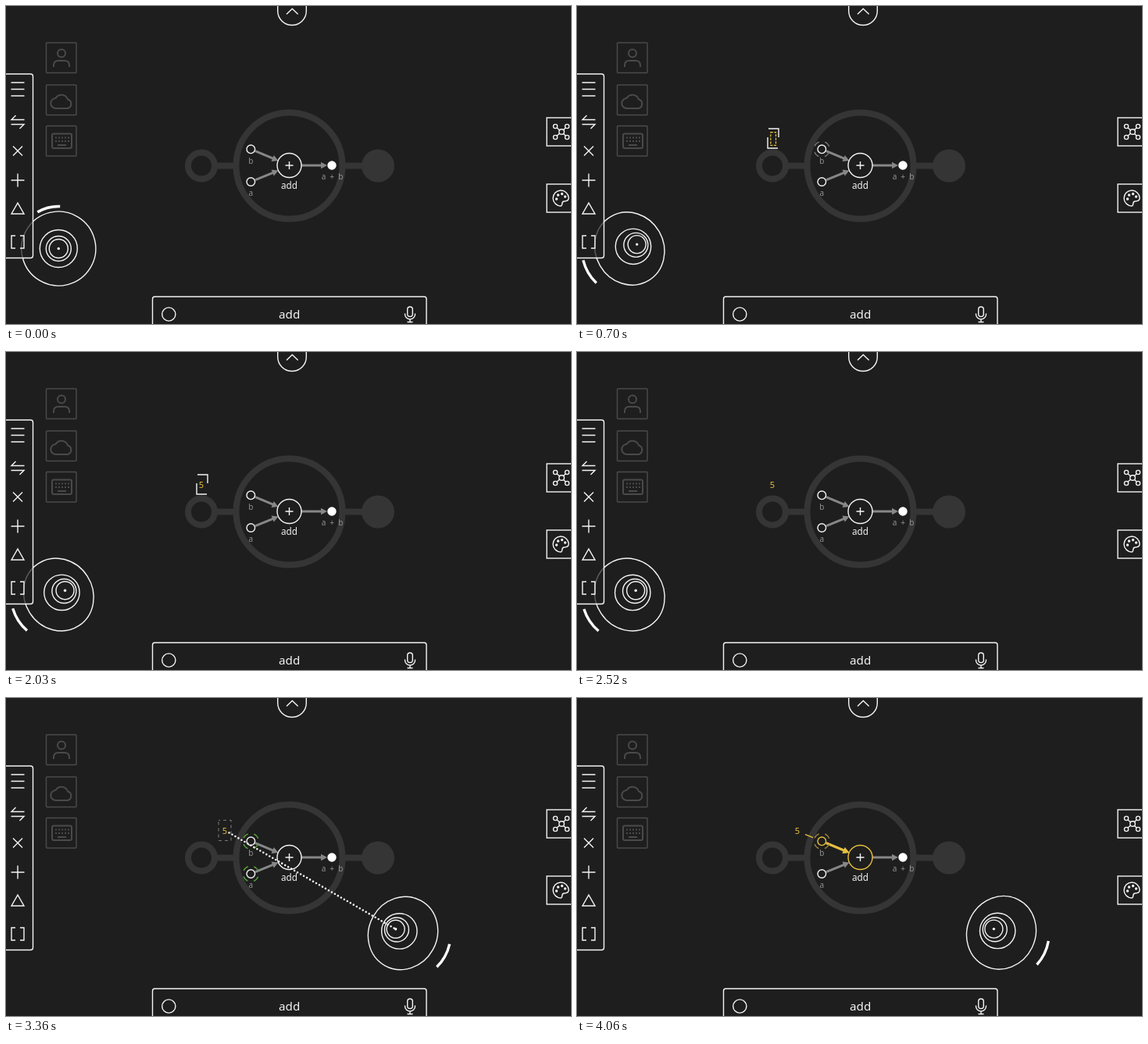
An HTML page that plays this animation: 723 px wide and 407 px high, repeating every 4130 ms.

```html
<!DOCTYPE html>
<html lang="en">
<head>
<meta charset="utf-8">
<title>Node editor</title>
<style>
html, body { margin: 0; width: 100%; height: 100%; overflow: hidden; background: #1e1e1e; }
svg { display: block; width: 723px; height: 407px; }
text { font-family: "Noto Sans", "Open Sans", sans-serif; text-anchor: middle; }
.line { fill: none; stroke: #f4f4f4; stroke-width: 1.4; }
.dim { fill: none; stroke: #4a4a4a; stroke-width: 1.5; }
.back { fill: none; stroke: #353535; stroke-width: 8; }
.panel { fill: #1e1e1e; stroke: #f4f4f4; stroke-width: 1.4; }
.small { font-size: 10px; fill: #929292; }
.ring { fill: none; stroke-width: 1.3; stroke-dasharray: 8 7.7; stroke-dashoffset: -3.85; }
.caret { fill: none; stroke: #e8c33c; stroke-width: 1.2; stroke-dasharray: 3 1.6; }
</style>
</head>
<body>
<svg viewBox="0 0 723 407">
  <rect width="723" height="407" fill="#1e1e1e"/>

  <g class="back">
    <circle cx="362.5" cy="204.5" r="68"/>
    <circle cx="250" cy="204.5" r="17"/>
    <path d="M267 204.5H295M430 204.5H458"/>
    <circle cx="476" cy="204.5" r="21" fill="#353535" stroke="none"/>
  </g>

  <g class="dim">
    <rect x="51.5" y="47" width="38.500" height="38.500" rx="1"/>
    <rect x="51.500" y="101" width="38.500" height="38.500" rx="1"/>
    <rect x="51.500" y="153.500" width="38.500" height="38.500" rx="1"/>
    <g stroke-width="2">
      <circle cx="71" cy="60.500" r="5"/>
      <path d="M61 78v-2q0-6 6-6h8q6 0 6 6v2"/>
      <path d="M64 131a6.500 6.500 0 0 1-.5-13a8.500 8.500 0 0 1 15.500 1.500a6 6 0 0 1 0 11.500z"/>
      <rect x="59" y="163.500" width="25" height="18.500" rx="2"/>
      <path d="M63 168.500H81M63 173H81" stroke-dasharray="2 2"/>
      <path d="M66 178H77"/>
    </g>
  </g>

  <g id="nodes">
    <g id="edges"></g>
    <circle id="add" class="line" cx="362.500" cy="204" r="15.500"/>
    <path class="line" d="M357.500 204h10M362.500 199v10"/>
    <circle id="nodeB" class="line" cx="313.300" cy="183.300" r="5.300"/>
    <circle class="line" cx="313.300" cy="225" r="5.300"/>
    <circle cx="417" cy="204" r="5.700" fill="#fff"/>
    <circle id="ringB" class="ring" cx="313.300" cy="183.300" r="10"/>
    <circle id="ringA" class="ring" cx="313.300" cy="225" r="10" stroke="#58a53c"/>
    <text x="362.500" y="234" font-size="11.700" fill="#f4f4f4">add</text>
    <text class="small" x="313.300" y="201.500">b</text>
    <text class="small" x="313.300" y="243">a</text>
    <text class="small" x="417.500" y="222" word-spacing="2.500">a + b</text>
  </g>

  <path id="link" fill="none" stroke="#e8c03c" stroke-width="1.400"/>
  <path id="beam" fill="none" stroke="#f4f4f4" stroke-width="2.600" stroke-linecap="round" stroke-dasharray="0 4.600"/>

  <g id="editor">
    <path class="line" stroke-width="1.200" d="M245 157H258V168M244 168V182H257"/>
    <rect id="caret" class="caret" x="247.800" y="161.600" width="6.700" height="16.800"/>
    <rect id="inner" class="caret" x="249.700" y="164" width="3" height="12" stroke-dasharray="2 1.200"/>
  </g>
  <g id="value">
    <rect id="frame" x="-8" y="-13.500" width="16" height="26" fill="none" stroke="#777" stroke-width="1.100" stroke-dasharray="4 4" stroke-dashoffset="2"/>
    <text id="five" y="4" font-size="11">5</text>
  </g>

  <g id="pad">
    <ellipse id="rim" class="line" ry="47.500"/>
    <circle id="c1" class="line"/>
    <circle id="c2" class="line"/>
    <circle id="c3" class="line"/>
    <circle id="dot" r="1.700" fill="#fff"/>
    <path id="arc" fill="none" stroke="#fff" stroke-width="3.400"/>
  </g>

  <rect class="panel" x="-6" y="87" width="40.500" height="235.500" rx="3" fill-opacity=".7"/>
  <g class="line" stroke-width="1.600">
    <path d="M6.500 98H23.500M6.500 106.500H23.500M6.500 115H23.500"/>
    <path d="M12.500 140L7 145.500H23.500M6.500 151.500H23L17.500 157"/>
    <path d="M9 179.500l12 12M21 179.500l-12 12"/>
    <path d="M6.500 223H23.500M15 214.500V231.500"/>
    <path d="M15 252L23 266H7Z"/>
    <path d="M12 294H7V310H12M18 294H23V310H18"/>
  </g>

  <rect class="panel" x="347.700" y="-40" width="36.600" height="64.500" rx="18.300"/>
  <path class="line" stroke-width="1.600" d="M359 10.500L366.300 3.500L373.600 10.500"/>

  <rect class="panel" x="692" y="143" width="40" height="36"/>
  <rect class="panel" x="692" y="228" width="40" height="36"/>
  <g class="line">
    <circle cx="711" cy="161" r="3.300"/>
    <circle cx="703" cy="154" r="2.600"/>
    <circle cx="718" cy="154" r="2.600"/>
    <circle cx="703" cy="168" r="2.600"/>
    <circle cx="718" cy="168" r="2.600"/>
    <path d="M705 156l3.500 3M716 156l-2.800 2.800M705 166l3.500-3M716 166l-2.800-2.800"/>
    <path d="M710 256a10 10 0 1 1 10-10.500c0 4-3 4.500-6 4.500c-4 0-1 6-4 6z"/>
    <circle cx="704.500" cy="247" r="1"/>
    <circle cx="706.500" cy="242" r="1"/>
    <circle cx="711.500" cy="240.500" r="1"/>
    <circle cx="715.500" cy="244" r="1"/>
  </g>

  <rect class="panel" x="187.500" y="372" width="350.500" height="50" rx="3"/>
  <circle class="line" cx="208.300" cy="394.500" r="8.600"/>
  <text x="362.700" y="400" font-size="15.200" fill="#f4f4f4">add</text>
  <g class="line">
    <rect x="513.700" y="385" width="6.600" height="12.500" rx="3.300"/>
    <path d="M510.500 393.500v1a6.500 6.500 0 0 0 13 0v-1M517 401v3.500M513.500 404.500h7"/>
  </g>
</svg>
<script>
const LOOP = 4130, STEP = 70;
const YELLOW = "#e8c03c", GREY = "#878787", WHITE = "#f4f4f4";
const el = id => document.getElementById(id);
const set = (id, attrs) => { for (const k in attrs) el(id).setAttribute(k, attrs[k]); };
const show = (id, on) => set(id, { visibility: on ? "visible" : "hidden" });
const within = (t, a, b) => t >= a && t < b;

// Eased value through [time, value] keys.
function track(t, ...keys) {
  if (t <= keys[0][0]) return keys[0][1];
  for (let i = 1; i < keys.length; i++) {
    const [t0, v0] = keys[i - 1], [t1, v1] = keys[i];
    if (t < t1) {
      const p = (t - t0) / (t1 - t0);
      return v0 + (v1 - v0) * p * p * (3 - 2 * p);
    }
  }
  return keys[keys.length - 1][1];
}

function arrow(x0, y0, x1, y1, color) {
  const turn = Math.atan2(y1 - y0, x1 - x0) * 180 / Math.PI;
  const len = Math.hypot(x1 - x0, y1 - y0);
  return `<g transform="translate(${x0} ${y0}) rotate(${turn})">` +
    `<path d="M0 0H${len - 6}" stroke="${color}" stroke-width="3"/>` +
    `<path d="M${len - 8} -4.300L${len} 0L${len - 8} 4.300Z" fill="${color}"/></g>`;
}

function drawPad(t) {
  const right = t >= 3150;
  const x = right ? track(t, [3150, 480], [3360, 508], [3570, 543]) : 67.3;
  const y = right ? track(t, [3150, 304], [3360, 301], [3570, 300.3]) : 310.5;
  const turn = right
    ? track(t, [3150, 80], [3360, 29], [3570, 26])
    : track(t, [0, -104], [350, -217], [560, -210], [1400, -210], [1540, -212], [2520, -213.5], [3010, -217]);
  const press = right ? track(t, [3080, 0], [3290, 1]) : track(t, [0, 0], [350, 1]);
  const reach = right ? 10.7 : track(t, [1400, 10.8], [1540, 10], [3010, 9.2]);
  const a = turn * Math.PI / 180;
  const dx = -Math.cos(a) * reach * press, dy = -Math.sin(a) * reach * press;
  set("pad", { transform: `translate(${x} ${y})` });
  set("rim", { rx: 47.5 - 3.8 * press, transform: `rotate(${turn})` });
  [[24, .5], [16, .86], [12, 1]].forEach(([r, k], i) =>
    set("c" + (i + 1), { r: r - press * (i ? .5 : 1.3), cx: dx * k, cy: dy * k }));
  set("dot", { cx: dx, cy: dy });
  const r = 54 + 7.2 * press, half = 16 * Math.PI / 180;
  const at = b => `${r * Math.cos(b)} ${r * Math.sin(b)}`;
  set("arc", { d: `M${at(a - half)}A${r} ${r} 0 0 1 ${at(a + half)}` });
  return [x + dx, y + dy];
}

function drawNodes(t) {
  const linked = t >= 3640, flow = track(t, [3640, 0], [3850, 1]);
  let edges = arrow(319, 185.7, 348.5, 198, GREY) + arrow(319, 222.7, 348.5, 210.5, GREY) +
    arrow(378, 204, 411, 204, GREY);
  if (flow > .3) edges += arrow(319, 185.7, 319 + 29.5 * flow, 185.7 + 12.3 * flow, YELLOW);
  el("edges").innerHTML = edges;
  set("nodeB", { style: `stroke:${linked ? YELLOW : WHITE}` });
  set("add", { style: `stroke:${flow === 1 ? YELLOW : WHITE}` });
  const targets = within(t, 3220, 3500);
  show("ringA", targets);
  show("ringB", targets || linked || within(t, 350, 1470) || within(t, 1750, 2030));
  set("ringB", { stroke: targets ? "#58a53c" : linked ? "#9a833c" : "#777" });
  show("link", linked);
  const p = Math.min(1, flow * 1.5);
  set("link", { d: `M292 174.700L${292 + 10 * p} ${174.7 + 4 * p}` });
}

function drawValue(t, tip) {
  const x = track(t, [3150, 250], [3360, 280], [3430, 282]);
  set("value", { transform: `translate(${x} 170)` });
  show("five", t >= 1820);
  set("five", { fill: within(t, 2800, 3150) ? "#dccb96" : YELLOW });
  show("frame", within(t, 2800, 3500));
  show("editor", within(t, 420, 2240));
  set("editor", { display: within(t, 420, 2240) ? "inline" : "none" });
  show("caret", within(t, 700, 1820));
  show("inner", within(t, 1190, 1820));
  show("beam", within(t, 3220, 3500));
  set("beam", { d: `M${x + 5.5} 172.500L${tip[0]} ${tip[1]}` });
}

function draw(time) {
  const t = Math.floor((time % LOOP) / STEP) * STEP;
  const tip = drawPad(t);
  drawNodes(t);
  drawValue(t, tip);
}

let start;
function tick(now) {
  if (start === undefined) start = now;
  draw(now - start);
  requestAnimationFrame(tick);
}
draw(0);
requestAnimationFrame(tick);
</script>
</body>
</html>
```
